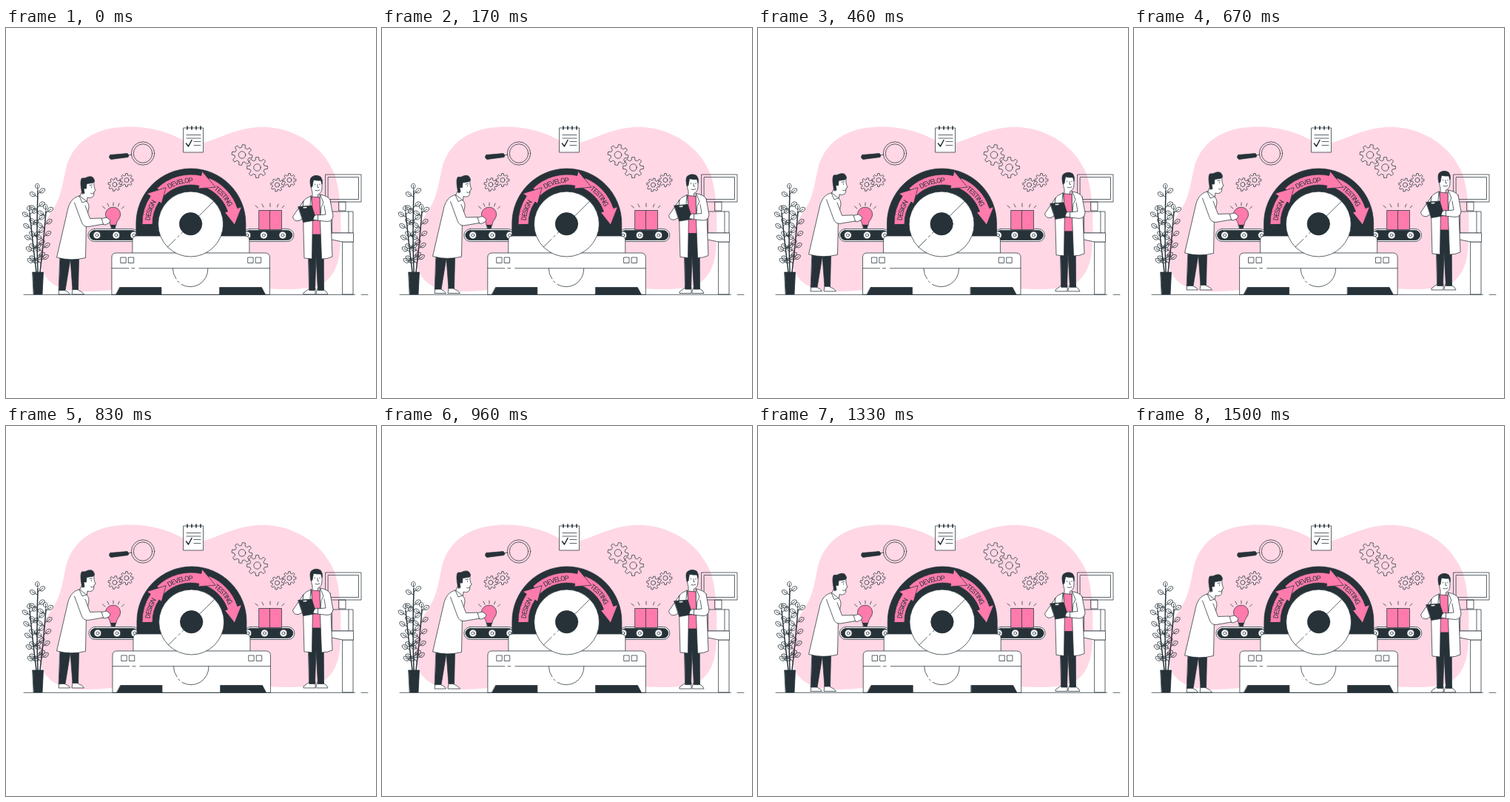
Write an HTML page that moves like this. It is 500 by 500 pixels and loops after 1.54 s.

```html
<!DOCTYPE html>
<html lang="en">
<head>
<meta charset="utf-8">
<title>Design, develop, testing</title>
<style>
html, body { margin: 0; width: 100%; height: 100%; overflow: hidden; background: #fff; }
svg { display: block; width: 100vw; height: 100vh; }
.o, .o * { stroke: #263238; stroke-width: .75; stroke-linecap: round; stroke-linejoin: round; }
.w { fill: #fff; }
.n { fill: none; }
.d { fill: #263238; }
.p { fill: #ff7bac; }
text { font: 400 9.2px Roboto, "Liberation Sans", sans-serif; letter-spacing: -.9px; text-anchor: middle; fill: #263238; }
</style>
</head>
<body>
<svg viewBox="0 0 500 500">
  <path fill="#ffd7e5" d="M80 195C85 165 106 142 145 135C180 130 214 137 240 152C258 161 272 154 290 147C316 136 340 131 362 135C402 141 432 166 445 200C453 228 453 262 452 290C451 325 438 348 410 351C370 357 325 348 270 347C210 346 160 354 112 356C76 357 52 347 46 318C41 286 52 262 63 246C74 230 76 213 80 195Z"/>

  <g class="o">
    <!-- monitor and cabinet -->
    <path class="n" d="M432 198H480V235H432ZM435.500 201.500H476.500V231.500H435.500ZM450 235H459V247H450Z"/>
    <path class="n" d="M441 248H469V277H441ZM463 248V277"/>
    <path class="w" d="M455 289H469V360H455Z"/>
    <path class="w" d="M440 277H469.500V289H455L440 286Z"/>

    <g id="plant"></g>
    <path class="d" d="M36 330H50.500L49 360H37.500Z"/>

    <!-- magnifier -->
    <circle class="n" cx="185" cy="169.500" r="15.700"/>
    <circle class="n" cx="185" cy="169.500" r="12.700"/>
    <path class="n" d="M165 172L170 171"/>
    <path class="d" d="M141 171.500L164 169.500Q167 172 165 174.500L142 177.500Q137.500 175 141 171.500Z"/>

    <!-- notepad -->
    <path class="w" d="M240 135H266.500V168H240Z"/>
    <path class="n" d="M244 144.500H263M244 149H263M254 153.500H263M254 158.500H263"/>
    <path class="n" style="stroke-width:1.600" d="M245 133V137M251 133V137M257 133V137M263 133V137M243.500 156L246.500 160L251 151.500"/>

    <g id="gears" class="n"></g>

    <g class="shake">
      <g id="belts"></g>
      <path class="d" d="M176 284V264A74 74 0 0 1 324 264V284Z"/>
    </g>

    <g id="arrows" class="p"></g>
  </g>

  <path id="arc" class="n" d="M194.500 264.500A55.500 55.500 0 0 1 305.500 264.500"/>
  <text><textPath href="#arc" startOffset="10%">DESIGN</textPath></text>
  <text><textPath href="#arc" startOffset="41.500%">DEVELOP</textPath></text>
  <text><textPath href="#arc" startOffset="77.500%">TESTING</textPath></text>

  <g class="o">
    <g class="shake">
      <path class="w" d="M171 304V287Q171 281 177 281H323Q329 281 329 287V304Z"/>
      <path class="w" d="M143 360V310Q143 304 149 304H350Q356.500 304 356.500 310V360Z"/>
      <path class="n" d="M143 324.700H166M170 324.700H174M180 324.700H356.500"/>
      <path class="n" d="M155.300 310H162.300V317.500H155.300ZM165.800 310H172.800V317.500H165.800ZM327.200 310H334.200V317.500H327.200ZM337.700 310H344.700V317.500H337.700Z"/>
      <path class="n" d="M225.500 325A24 24 0 0 0 230 339M232 342L234 344M237 346.500A24 24 0 0 0 273 325"/>
      <path class="d" d="M154 350.500H210V360H149ZM289 350.500H345.500L350.500 360H289Z"/>
      <circle class="w" cx="249.700" cy="265" r="44"/>
      <path class="n" d="M281 234L218.500 296" stroke-dasharray="62 4 3 4 20"/>
      <circle class="d" cx="249.700" cy="264.700" r="15.200"/>
    </g>

    <!-- bulb -->
    <path class="d" d="M141.500 265H148.500L147.500 270.500H142.500Z"/>
    <path class="p" d="M141 266C141 260 134 258 134.500 251.500C135.500 239.500 153.500 239 154.500 251C155 258 149 260 149 266Z"/>
    <path class="n" d="M130.500 241L134 244M137 237L139 241M145 236V240M153 237L151.500 241M159.500 241L156.500 244"/>

    <!-- box -->
    <path class="p" d="M342 246.500H372.500V272.500H342ZM356.500 246.500V272.500"/>
    <path class="n" d="M337 240L340.500 243M346 238L348 242M357 237V241.500M368 238L366.500 242M376 240L373 243"/>

    <!-- left man -->
    <g class="float">
      <path class="w" d="M72 353L71 360H86.500Q85 356.500 79.500 354.500V352H72ZM90 353L89 360H105.500Q104 356.500 97 354V352H90Z"/>
      <path class="d" d="M74 290H99L97.500 353.500H90L87 312L80 354.500H71.500Z"/>
      <path class="w" d="M106 210L119 207.500C118.500 212 119 215 121 219.500L119 221L118.500 226C117 230 113 230 110 229L109 237L98 231L103 220Z"/>
      <path class="d" d="M103 224C101 215 100 206 102.500 203Q107 203.500 110 201.500C114 200 118 201 118.500 204C120.500 206 119.500 209 116 209.500L109 210.500L108.500 217L105 217L106 223Z"/>
      <path class="n" d="M113 212.500L116.500 212M115.500 214.500V215.500M114.500 223.500Q116.500 225 118.500 223"/>
      <path class="w" d="M99 227C91 229 87 234 84 243L68.500 310Q88 315.500 107.500 310.500L108.500 262L112 242Q112 236 107.500 233Z"/>
      <path class="n" d="M99 227L103 236L108.500 234"/>
      <path class="w" d="M129 257.500L136 256L141 260L139.500 263.500L134 266L130 265Z"/>
      <path class="w" d="M92.500 236L102 262Q104.500 269 111 268.500L131.500 265L129 257L113.500 257.500L107 240"/>
    </g>

    <!-- right man -->
    <g class="float">
      <path class="w" d="M410 352L402 358V360H418V352ZM421 352L419 358V360H435Q434 356 429.500 354V352Z"/>
      <path class="d" d="M408 272H429L429.500 354.500H421.500L419 308L417.500 354.500H410Z"/>
      <path class="w" d="M412.500 205H427V215.500Q427 223 421.500 225V234L414 232V222Q412 218 412.500 205Z"/>
      <path class="d" d="M412 215Q409.500 204 413 201.500Q419 197.500 425 201Q428 204 427 211L425.500 206Q419 206.500 415.500 205L414 214Z"/>
      <path class="n" d="M417.500 211V212M424 211V212M421 211.500V215.500H422.500M418 219.500Q421 221 424 219"/>
      <path class="p" d="M413.500 228L424.500 229L426 279H413Z"/>
      <path class="w" d="M412 227Q404 230 401 235L403 311L413.500 312L414.500 250Z"/>
      <path class="w" d="M424.500 225Q435 227 438 232L441 309Q434 312.500 426.500 312L424.500 260Z"/>
      <path class="n" d="M424.500 225L429 236L426 242L424.500 260M412 227L411 239L414 248"/>
      <path class="w" d="M438 232L442 254Q441 261.500 434 261.500L420 260L421 253L432 252L430 240"/>
      <path class="w" d="M402 234L387.500 255Q389 262 396 260.500L402 257L400 247Z"/>
      <path class="d" d="M395 241.500L413 240L419.500 259.500L402 262.500Z"/>
      <path class="w" d="M401 242L406.500 241L407 243.500L402 244ZM417 253.500L421.500 252V260L415 259Z"/>
    </g>

    <path class="n" d="M24 360.300H471.500M480 360.300H489"/>
  </g>
</svg>
<script>
const $ = id => document.getElementById(id);
const polar = (cx, cy, r, deg) => {
  const a = deg * Math.PI / 180;
  return (cx + r * Math.cos(a)).toFixed(2) + ' ' + (cy + r * Math.sin(a)).toFixed(2);
};

function gear(cx, cy, r, turn) {
  const pts = [];
  for (let i = 0; i < 8; i++) {
    const a = turn + i * 45;
    [[-14, .72], [-8, 1], [8, 1], [14, .72]].forEach(([da, k]) => pts.push(polar(cx, cy, r * k, a + da)));
  }
  return `<path d="M${pts.join('L')}Z"/><circle cx="${cx}" cy="${cy}" r="${r * .34}"/>`;
}
$('gears').innerHTML = [
  [319, 171.500, 14, 10], [339.500, 188.500, 14, 0], [366.500, 212, 9, 10],
  [383, 205.500, 9, 0], [147, 211.500, 9, 10], [163, 205.500, 9, 0]
].map(g => gear(...g)).join('');

// Curved arrow; angles run clockwise from the left end of the dial.
function arrow(from, neck, tip) {
  const at = (r, a) => polar(250, 264, r, 180 + a);
  return `<path d="M${at(66, from)}A66 66 0 0 1 ${at(66, neck)}L${at(72, neck)}L${at(59, tip)}` +
    `L${at(48, neck)}L${at(52, neck)}A52 52 0 0 0 ${at(52, from)}Z"/>`;
}
$('arrows').innerHTML = arrow(112, 162, 182) + arrow(46, 102, 124) + arrow(-1, 34, 55);

const belt = (x, rollers) =>
  `<rect class="w" x="${x}" y="271.500" width="68" height="17" rx="8.500"/>` +
  `<rect class="d" x="${x + 2}" y="273.500" width="64" height="13" rx="6.500"/>` +
  rollers.map(cx => `<circle class="w" cx="${cx}" cy="280" r="5"/><circle class="n" cx="${cx}" cy="280" r="2"/>`).join('');
$('belts').innerHTML = belt(111, [123, 149, 173]) + belt(321, [326, 348.5, 374]);

// Each stem is a quadratic curve with leaves in pairs.
function stem(x0, y0, cx, cy, x1, y1, pairs) {
  const leaf = (x, y, a, l) => `<path class="n" transform="translate(${x} ${y}) rotate(${a})" ` +
    `d="M0 0H${l * .3}C${l * .4} -4 ${l * .85} -4 ${l} 0C${l * .85} 3.500 ${l * .4} 3.500 ${l * .3} 0H${l * .75}"/>`;
  let s = `<path class="n" style="stroke-width:1.500" d="M${x0} ${y0}Q${cx} ${cy} ${x1} ${y1}"/>`;
  for (let i = 0; i < pairs; i++) {
    const t = .15 + .78 * i / (pairs - 1), u = 1 - t;
    const x = u * u * x0 + 2 * u * t * cx + t * t * x1;
    const y = u * u * y0 + 2 * u * t * cy + t * t * y1;
    s += leaf(x, y, 210, 12) + leaf(x, y - 4, -35, 12);
  }
  return s + leaf(x1, y1, -95, 10);
}
$('plant').innerHTML = stem(43, 330, 41, 280, 43, 220, 6) +
  stem(41, 330, 36, 290, 32, 250, 5) + stem(46, 330, 51, 290, 54, 248, 5);

const LOOP = 1540, CYCLE = 1500, STEP = 1000 / 24, RISE = 6.8;
const sway = [0, -.8, 1.6, -2.5, 2.5, -2.5, 2.5, -2.5, 1.6, -.8, 0];
const shakers = document.querySelectorAll('.shake');
const floaters = document.querySelectorAll('.float');

function draw(ms) {
  const t = Math.floor((ms % LOOP + 4) / STEP) * STEP;
  const s = (t + 20) % CYCLE / CYCLE * 10, i = Math.floor(s);
  const x = sway[i] + (sway[i + 1] - sway[i]) * (s - i);
  const y = -RISE * (1 - Math.abs(1 - 2 * (t % CYCLE) / CYCLE));
  shakers.forEach(g => g.setAttribute('transform', `translate(${x.toFixed(3)} 0)`));
  floaters.forEach(g => g.setAttribute('transform', `translate(0 ${y.toFixed(3)})`));
}

const start = performance.now();
function tick() {
  draw(performance.now() - start);
  requestAnimationFrame(tick);
}
draw(0);
requestAnimationFrame(tick);
</script>
</body>
</html>
```
